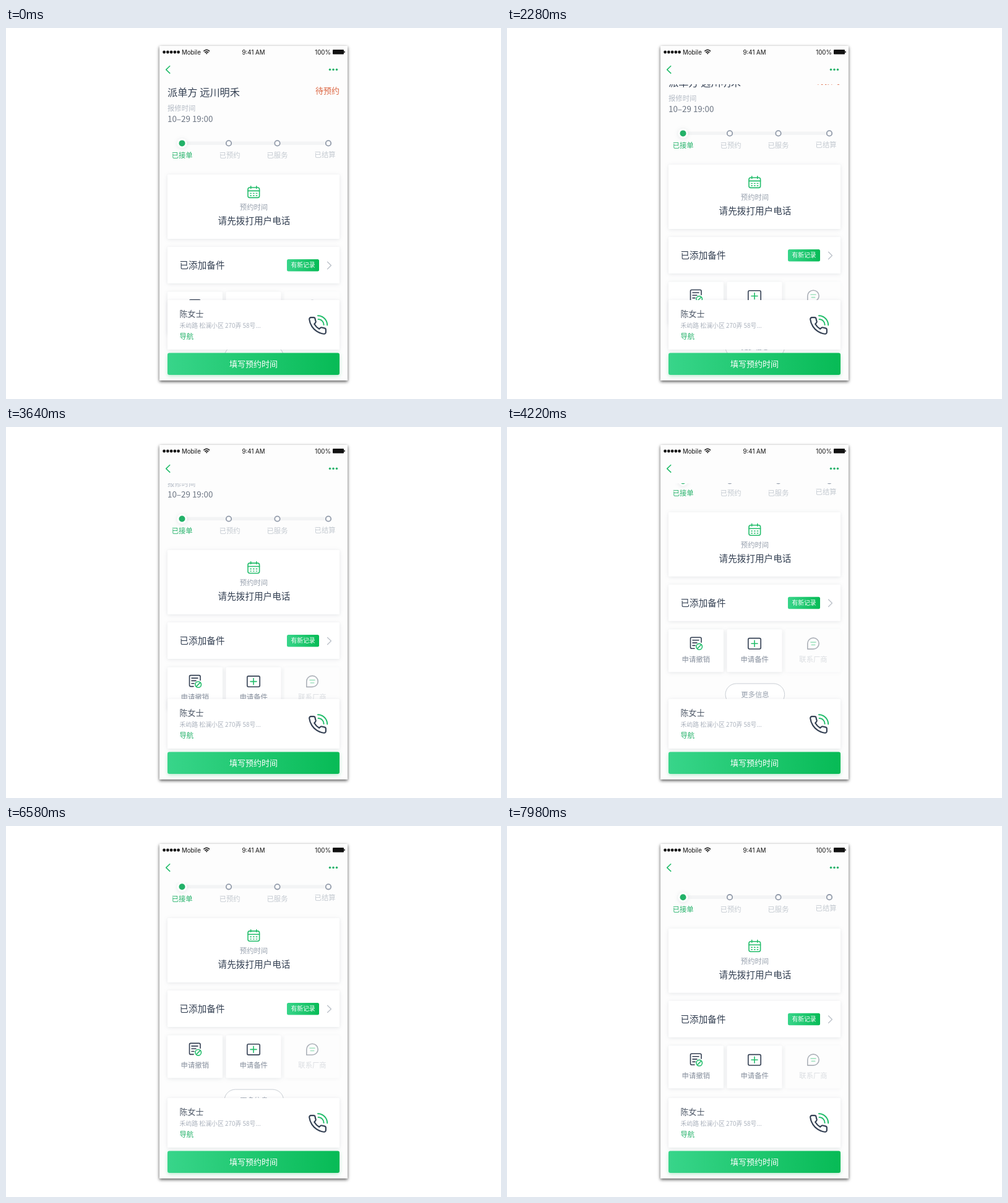
These frames come from a looping animation (800x600 px, 8000 ms). An HTML page:

```html
<!DOCTYPE html>
<html lang="zh">
<head>
<meta charset="utf-8">
<style>
html, body { margin: 0; width: 100%; height: 100%; overflow: hidden; background: #fff; }
svg { display: block; width: 100%; height: 100%; }
text { font-family: "Noto Sans CJK SC", "Noto Sans CJK", "Noto Sans CJK JP", sans-serif; }
.bar { font-family: Inter, Roboto, sans-serif; font-size: 9.7px; fill: #111; }
.mid { text-anchor: middle; }
.bold { font-weight: 500; }
.s { font-size: 11.35px; }
.m { font-size: 13px; }
.l { font-size: 14.6px; }
.dark { fill: #344053; }
.gray { fill: #98a1ae; }
.pale { fill: #c4cad1; }
.green { fill: #22b168; }
.line { fill: none; stroke: #344053; stroke-width: 1.6; stroke-linecap: round; stroke-linejoin: round; }
.g { stroke: #23bd6b; }
.card { fill: #fff; filter: drop-shadow(0 1.5px 3px rgba(60, 75, 95, .13)); }
</style>
</head>
<body>
<svg viewBox="0 0 800 600">
  <defs>
    <linearGradient id="grad"><stop stop-color="#38d58a"/><stop offset="1" stop-color="#07bb56"/></linearGradient>
    <clipPath id="view"><path d="M248 91H552V570H248z"/></clipPath>
  </defs>

  <rect x="248" y="29" width="304" height="541" fill="#fdfdfd"
    style="filter:drop-shadow(0 2px 2.5px rgba(0,0,0,.62)) drop-shadow(0 1px 3px rgba(0,0,0,.08))"/>

  <!-- status and navigation bars -->
  <g id="signal" fill="#111"></g>
  <text class="bar" x="284" y="43">Mobile</text>
  <g fill="none" stroke="#111" stroke-width="1.5">
    <path d="M319.4 37.6Q324.2 33 329 37.6M321.2 39.7Q324.2 37 327.2 39.7"/>
    <path d="M322.3 40.5h3.8l-1.9 2z" fill="#111" stroke="none"/>
  </g>
  <text class="bar mid" x="400" y="43">9:41 AM</text>
  <text class="bar" x="525" y="43" text-anchor="end">100%</text>
  <rect x="528" y="35" width="18" height="7.4" rx="1" fill="#111"/>
  <rect x="546.3" y="37.2" width="1.5" height="3" rx=".7" fill="#111"/>
  <path class="line g" d="M264.7 61.5L258.7 67.3L264.7 73.1"/>
  <g class="green"><circle cx="523.5" cy="67.3" r="1.7"/><circle cx="529" cy="67.3" r="1.7"/><circle cx="534.5" cy="67.3" r="1.7"/></g>

  <g clip-path="url(#view)">
    <g id="page">
      <text class="dark bold" x="261" y="109.8" font-size="16.2">派单方 远川明禾</text>
      <text class="m" x="500" y="106.3" fill="#dc6642">待预约</text>
      <text class="s pale" x="261" y="134" style="fill:#b5bcc6">报修时间</text>
      <text x="261" y="151.5" font-size="13.4" fill="#6c7583">10–29 19:00</text>

      <rect x="284" y="183.5" width="237" height="5.5" fill="#f3f4f5"/>
      <circle class="card" cx="284.5" cy="186.4" r="8"/>
      <circle class="green" cx="284.5" cy="186.4" r="5"/>
      <g fill="#fff" stroke="#929baa" stroke-width="1.8">
        <circle cx="360" cy="186.4" r="4.2"/><circle cx="438.5" cy="186.4" r="4.2"/><circle cx="521" cy="186.4" r="4.2"/>
      </g>
      <g class="s mid pale">
        <text class="green" x="284.7" y="210">已接单</text>
        <text x="361.7" y="210">已预约</text>
        <text x="438.5" y="210">已服务</text>
        <text x="515.6" y="208.5">已结算</text>
      </g>

      <rect class="card" x="261" y="237" width="278" height="104" rx="1.5"/>
      <g class="line g">
        <rect x="391" y="258" width="18.6" height="16.4" rx="3"/>
        <path d="M391 263.4h18.6M395.7 255.8v3.6M404.8 255.8v3.6"/>
        <path d="M394.8 267.4h1.6M399.5 267.4h1.6M404.2 267.4h1.6M394.8 271h1.6M399.5 271h1.6M404.2 271h1.6" stroke-width="1.4"/>
      </g>
      <text class="s mid gray" x="400.5" y="294.2">预约时间</text>
      <text class="l mid dark" x="401" y="317">请先拨打用户电话</text>

      <rect class="card" x="261" y="354" width="278" height="59" rx="1.5"/>
      <text class="l bold dark" x="280.5" y="389">已添加备件</text>
      <rect x="454" y="374" width="52" height="19.5" rx="2.5" fill="url(#grad)"/>
      <text class="mid bold" x="480" y="387.4" font-size="9.75" fill="#fff">有新记录</text>
      <path class="line" d="M519.6 378.3L525.4 384L519.6 389.7" style="stroke:#bcc2ca;stroke-width:1.4"/>

      <rect class="card" x="261" y="426.5" width="89" height="69" rx="1.5"/>
      <rect class="card" x="355.5" y="426.5" width="89" height="69" rx="1.5"/>
      <rect class="card" x="450" y="426.5" width="89" height="69" rx="1.5" opacity=".35"/>
      <g class="line">
        <path d="M303 457.5h-4.5q-2 0-2-2v-14q0-2 2-2h13.5q2 0 2 2v6M300 444h10M300 448.3h7M300 452.6h4"/>
        <circle class="g" cx="310.7" cy="454.4" r="4.8"/>
        <path class="g" d="M307.8 457.3l5.8-5.8"/>
        <rect x="389.8" y="440.8" width="20.4" height="17.4" rx="2.2"/>
        <path class="g" d="M395 449.5h10M400 444.5v10"/>
      </g>
      <g class="line" opacity=".4">
        <path d="M485.8 458.3v-9a9.2 9 0 1 1 9.2 9z"/>
        <path class="g" d="M491 447.3h8M492.3 451.6h5.4"/>
      </g>
      <g class="s mid bold">
        <text x="305.3" y="479.2" fill="#858e9c">申请撤销</text>
        <text x="400.2" y="479.2" fill="#858e9c">申请备件</text>
        <text x="495" y="479.2" fill="#dadde1">联系厂商</text>
      </g>

      <rect x="353" y="514.2" width="95.6" height="35.2" rx="17.6" fill="#fff" stroke="#c9ced4"/>
      <text class="s mid gray" x="401" y="536.2">更多信息</text>
    </g>
  </g>

  <!-- fixed contact sheet -->
  <rect class="card" x="261" y="440" width="278" height="80" rx="1.5"/>
  <text class="m" x="280.5" y="467" fill="#4b5565">陈女士</text>
  <text x="280.5" y="485.3" font-size="9.9" fill="#abb2bd">禾屿路 松澜小区 270弄 58号...</text>
  <text class="s bold green" x="280.5" y="503">导航</text>
  <path class="line" transform="translate(487.4 465.4) scale(1.34)" stroke-width="1.4"
    d="M22 16.9v3a2 2 0 0 1-2.2 2a20 20 0 0 1-8.6-3.1a19.5 19.5 0 0 1-6-6A20 20 0 0 1 2.1 4.2A2 2 0 0 1 4.1 2h3a2 2 0 0 1 2 1.7a13 13 0 0 0 .7 2.8a2 2 0 0 1-.5 2.1L8.1 9.9a16 16 0 0 0 6 6l1.3-1.3a2 2 0 0 1 2.1-.4a13 13 0 0 0 2.8.7A2 2 0 0 1 22 16.9z"/>
  <path class="line g" style="stroke-width:2" d="M504 465.3A15.2 15.2 0 0 1 519.2 480.5M504.6 471A9 9 0 0 1 513.6 480"/>

  <rect x="261" y="525.5" width="278" height="35.5" rx="3" fill="url(#grad)"
    style="filter:drop-shadow(0 2px 3px rgba(30,190,100,.3))"/>
  <text class="m mid bold" x="400" y="548.3" fill="#fff">填写预约时间</text>
</svg>
<script>
const LOOP = 8000;
// [time in ms, scroll distance in px]
const path = [
  [0, 0], [1660, 0], [2280, 16], [2400, 16], [3240, 32.4], [3500, 32.4],
  [3900, 48], [4100, 74], [4220, 99], [4250, 105], [4300, 133.5], [6390, 133.5],
  [6480, 109], [6560, 91], [6640, 80], [6760, 73], [6900, 72.7], [7980, 71.2], [LOOP, 71.2]
];
const page = document.getElementById('page');

document.getElementById('signal').innerHTML = [0, 1, 2, 3, 4]
  .map(i => `<circle cx="${255.6 + i * 5.75}" cy="39" r="2.4"/>`).join('');

function scrollAt(t) {
  const i = path.findIndex(p => p[0] > t);
  const [t0, y0] = path[i - 1], [t1, y1] = path[i];
  return y0 + (y1 - y0) * (t - t0) / (t1 - t0);
}

function draw() {
  page.setAttribute('transform', `translate(0 ${-scrollAt(performance.now() % LOOP)})`);
  requestAnimationFrame(draw);
}
draw();
</script>
</body>
</html>
```
